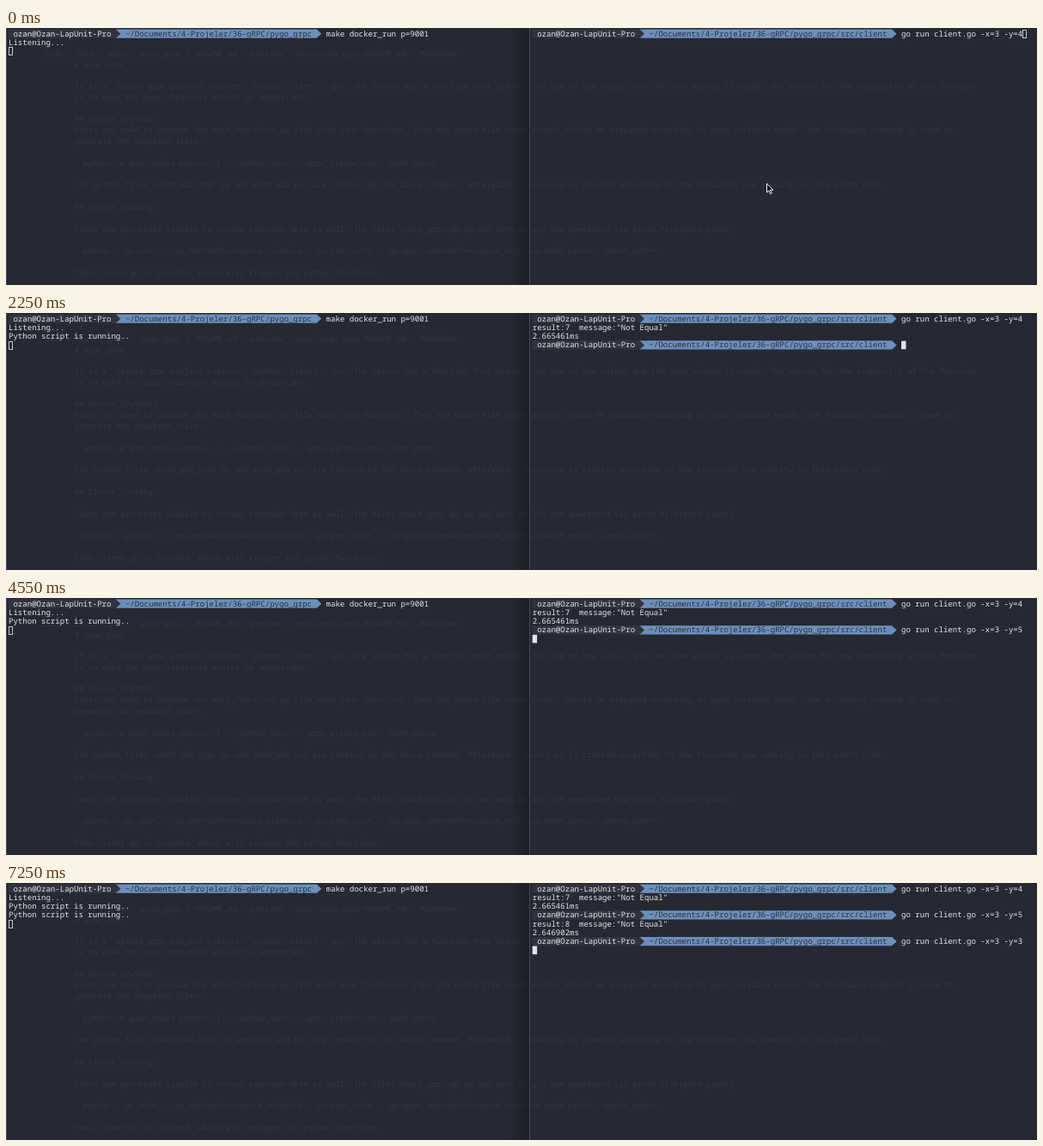
Write an HTML page with a canvas that moves like this. It is 1200 px wide and 300 px high and loops after 8000 ms.

```html
<!DOCTYPE html>
<html lang="en">
<head>
<meta charset="utf-8">
<title>Two terminals</title>
<style>
  html, body { margin: 0; width: 1200px; height: 300px; overflow: hidden; background: #262933; }
  canvas { display: block; }
</style>
</head>
<body>
<canvas id="stage" width="1200" height="300"></canvas>
<script>
const LOOP = 8000, COL = 5.435, ROW = 10.25, TOP = 1.5;
const LEFT = 3, RIGHT = 612.7, DIVIDER = 609;
const FONT = '"Noto Sans Mono", "DejaVu Sans Mono", monospace';
const BG = '#262933', HOST_BG = '#31343f', PATH_BG = '#6c8fbb', INK = '#e4e5e8';
const HOST = 'ozan@Ozan-LapUnit-Pro';
const PATH = '~/Documents/4-Projeler/36-gRPC/pygo_grpc';
const RUN = 'go run client.go -x=3 -y=';

// Page that shows faintly through the translucent windows: [x, y, text]
const PAGE = [
  [45, 30, 'Code / Docs / grpc / pygo_grpc / README.md - preview - grpc/pygo_grpc/README.md - Markdown'],
  [80, 43, '# pygo_grpc'],
  [80, 68, 'It is a  simple grpc project (server : python, client : go). The server has a function that returns the sum of two values and the same values is coded. The reason for the simplicity of the function'],
  [80, 81, 'is to make the grpc structure easier to understand.'],
  [80, 106, '## Server (Python)'],
  [80, 119, 'First you need to prepare the math_functions.py file with your functions. Then the proto file (math.proto) should be prepared according to your variable needs. The following command is used to'],
  [80, 132, 'generate the required files.'],
  [90, 158, 'python -m grpc_tools.protoc -I. --python_out=. --grpc_python_out=. math.proto'],
  [80, 183, 'The python files (math_pb2_grpc.py and math_pb2.py) are created by the above command. Afterwards, server.py is created according to the structure you specify in this proto file.'],
  [80, 209, '## Client (Golang)'],
  [80, 235, 'There are processes similar to server creation here as well. The files (math_grpc.pb.go and math.pb.go) are generated via proto file(math.proto)'],
  [90, 260, 'protoc --go_out=. --go_opt=paths=source_relative --go-grpc_out=. --go-grpc_opt=paths=source_relative math.proto --proto_path=.'],
  [80, 286, 'Then client.go is created, which will trigger the python functions.']
];

const ctx = document.getElementById('stage').getContext('2d');
const rowTop = row => TOP + row * ROW;

function write(text, x, y, color, size = COL / 0.6) {
  ctx.font = `${size}px ${FONT}`;
  ctx.fillStyle = color;
  ctx.fillText(text, x, y);
}

const line = (text, x, row, color = INK) => write(text, x, rowTop(row) + 8.2, color);

function shape(color, ...points) {
  ctx.fillStyle = color;
  ctx.beginPath();
  points.forEach(([x, y]) => ctx.lineTo(x, y));
  ctx.fill();
}

// One prompt segment, ending in an arrow tip
function segment(x, row, cols, color) {
  const y = rowTop(row), end = x + cols * COL;
  shape(color, [x, y], [end, y], [end + COL, y + ROW / 2], [end, y + ROW], [x, y + ROW]);
}

function prompt(x, row, path, command) {
  const pathX = x + (HOST.length + 2) * COL;
  const pathCols = path.length + 3;
  segment(pathX, row, pathCols, PATH_BG);
  segment(x, row, HOST.length + 2, HOST_BG);
  line(HOST, x + COL, row);
  line(path, pathX + 2 * COL, row, '#29303e');
  line(command, pathX + (pathCols + 2) * COL, row);
  return HOST.length + pathCols + 4 + command.length;
}

function cursor(x, row, col, solid) {
  const left = x + col * COL, y = rowTop(row) + 0.4;
  if (solid) {
    ctx.fillStyle = INK;
    ctx.fillRect(left, y, COL, 9.6);
  } else {
    ctx.strokeStyle = '#c4c6cb';
    ctx.lineWidth = 1;
    ctx.strokeRect(Math.round(left) + 0.5, Math.round(y) + 0.5, 4, 9);
  }
}

function pointer(x, y) {
  const outline = [[0, 0], [0, 10.5], [2.4, 8.3], [4, 12], [5.8, 11.2], [4.2, 7.6], [7.4, 7.6]];
  ctx.save();
  ctx.translate(x, y);
  shape('#15161b', ...outline);
  ctx.closePath();
  ctx.strokeStyle = '#f2f2f2';
  ctx.stroke();
  ctx.restore();
}

function backdrop() {
  ctx.fillStyle = BG;
  ctx.fillRect(0, 0, 1200, 300);
  for (const [x, y, text] of PAGE) write(text, x, y + 3, 'rgba(70, 75, 88, .42)', 8.9);
  const shade = ctx.createLinearGradient(585, 0, DIVIDER, 0);
  shade.addColorStop(0, 'rgba(20, 21, 27, 0)');
  shade.addColorStop(1, 'rgba(20, 21, 27, .5)');
  ctx.fillStyle = shade;
  ctx.fillRect(585, 0, DIVIDER - 585, 300);
  ctx.fillStyle = '#484b56';
  ctx.fillRect(0, 0, 1, 300);
  ctx.fillRect(DIVIDER, 0, 1, 300);
}

function server(t) {
  const calls = (t >= 2250) + (t >= 5350);
  prompt(LEFT, 0, PATH, 'make docker_run p=9001');
  line('Listening...', LEFT, 1);
  for (let i = 0; i < calls; i++) line('Python script is running..', LEFT, 2 + i);
  cursor(LEFT, 2 + calls, 0, false);
}

// Each run: when its prompt shows, its command edits, Enter, and its output
const RUNS = [
  { from: 0, edits: [[0, RUN + '4']], enter: 1000, done: 2250, out: ['result:7  message:"Not Equal"', '2.665461ms'] },
  { from: 2250, edits: [[2800, RUN + '4'], [3850, RUN], [4400, RUN + '5']], enter: 4550, done: 5350, out: ['result:8  message:"Not Equal"', '2.646902ms'] },
  { from: 5350, edits: [[6000, RUN + '5'], [6800, RUN], [7150, RUN + '3']], enter: 7250, done: LOOP, out: [] }
];

function client(t) {
  RUNS.forEach((run, i) => {
    if (t < run.from) return;
    const row = i * 3;
    const edit = run.edits.filter(([at]) => t >= at).pop();
    const end = prompt(RIGHT, row, PATH + '/src/client', edit ? edit[1] : '');
    if (t >= run.done) run.out.forEach((text, k) => line(text, RIGHT, row + 1 + k));
    else if (t >= run.enter) cursor(RIGHT, row + 1, 0, true);
    else cursor(RIGHT, row, end, t >= 50);
  });
}

function draw(now) {
  const t = now % LOOP;
  ctx.textRendering = 'geometricPrecision';
  backdrop();
  server(t);
  client(t);
  if (t < 1000) {
    const step = Math.min(7, Math.floor(t / 50)) / 7;
    const move = step * step * (3 - 2 * step);
    pointer(885.5 + 55 * move, 181.5 - 127 * move);
  }
  requestAnimationFrame(draw);
}
requestAnimationFrame(draw);
</script>
</body>
</html>
```
